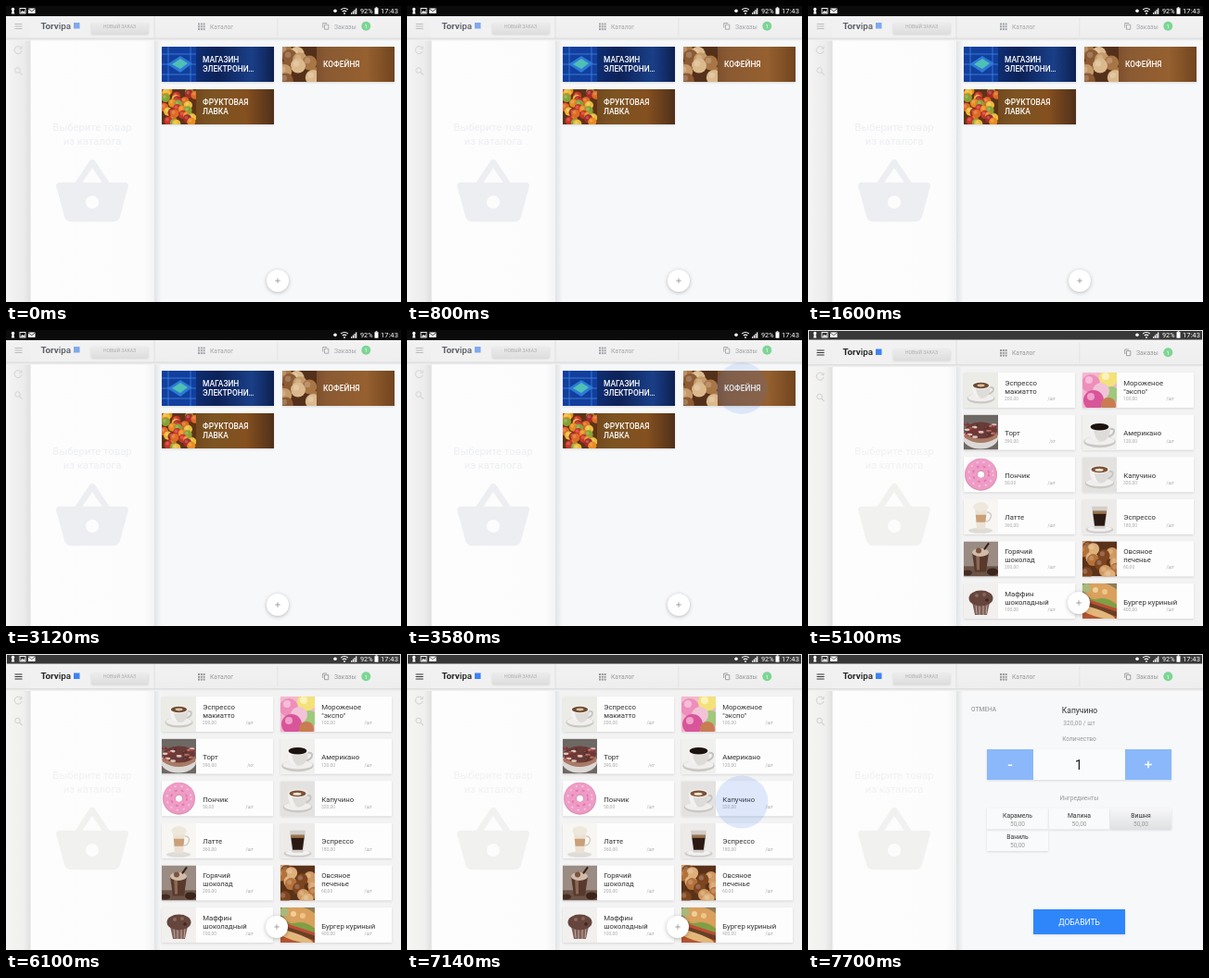
An HTML page that plays this animation: 426 px wide and 320 px high, repeating every 8 s.

```html
<!DOCTYPE html>
<html lang="ru">
<head>
<meta charset="utf-8">
<title>Касса</title>
<style>
  html, body { margin: 0; width: 100%; height: 100%; overflow: hidden; background: #f6f7f9; }
  svg { display: block; width: 100%; height: 100%; font-family: Roboto, sans-serif; }
  .lift { filter: drop-shadow(0 1px 1.3px rgba(0, 0, 0, .12)); }
  .fab { filter: drop-shadow(0 1px 2px rgba(0, 0, 0, .25)); }
  .screen, .tap { animation: 8s linear infinite both; }
  #list { animation-name: openList; }
  #detail { animation-name: openDetail; }
  .tap { transform-box: fill-box; transform-origin: center; }
  #tapShop { animation-name: tapShop; }
  #tapItem { animation-name: tapItem; }
  @keyframes openList { 0%, 45.5% { opacity: 0 } 47.5%, 100% { opacity: 1 } }
  @keyframes openDetail { 0%, 92.5% { opacity: 0 } 94.5%, 100% { opacity: 1 } }
  @keyframes tapShop {
    0%, 40.5% { opacity: 0; transform: scale(.5) }
    42%, 44.5% { opacity: .16; transform: scale(1) }
    46%, 100% { opacity: 0; transform: scale(1) }
  }
  @keyframes tapItem {
    0%, 87% { opacity: 0; transform: scale(.5) }
    88.5%, 91.5% { opacity: .16; transform: scale(1) }
    93%, 100% { opacity: 0; transform: scale(1) }
  }
</style>
</head>
<body>
<script>
const rect = (x, y, w, h, fill, more = '') =>
  `<rect x="${x}" y="${y}" width="${w}" height="${h}" fill="${fill}" ${more}/>`;
const disc = (x, y, r, fill, more = '') => `<circle cx="${x}" cy="${y}" r="${r}" fill="${fill}" ${more}/>`;
const oval = (x, y, rx, ry, fill) => `<ellipse cx="${x}" cy="${y}" rx="${rx}" ry="${ry}" fill="${fill}"/>`;
const path = (d, fill) => `<path d="${d}" fill="${fill}"/>`;
const line = (d, stroke, width = 1) => `<path d="${d}" fill="none" stroke="${stroke}" stroke-width="${width}"/>`;
const text = (x, y, size, fill, str, anchor = 'start', weight = 400) =>
  `<text x="${x}" y="${y}" font-size="${size}" fill="${fill}" text-anchor="${anchor}" font-weight="${weight}">${str}</text>`;
const at = (x, y, body) => `<g transform="translate(${x} ${y})">${body}</g>`;
const turn = (angle, body) => `<g transform="rotate(${angle} 18 19)">${body}</g>`;
const gradient = (id, dir, ...stops) =>
  `<linearGradient id="${id}" x2="${dir === 'h' ? 1 : 0}" y2="${dir === 'h' ? 0 : 1}">` +
  stops.map(([offset, color]) => `<stop offset="${offset}" stop-color="${color}"/>`).join('') + '</linearGradient>';

function random(seed) {
  return () => (seed = seed * 16807 % 2147483647) / 2147483647;
}

// Overlapping balls, used for piles of food
function pile(seed, count, radius, colors) {
  const rnd = random(seed);
  return Array.from({ length: count }, (_, i) => {
    const x = rnd() * 37, y = (i + .5) / count * 38, color = colors[i % colors.length];
    return disc(x, y, radius, color) + disc(x - radius * .25, y - radius * .3, radius * .4, '#fff', 'opacity=".2"');
  }).join('');
}

const backdrop = color => rect(0, 0, 37, 38, color);

const cup = (drink, back, scale = 1) => backdrop(back) +
  `<g transform="translate(18.5 20) scale(${scale}) translate(-19 -20)">` +
  oval(19, 28, 15, 5.5, '#c9c8c5') + oval(19, 27, 14, 4.2, '#f0efed') +
  line('M28 16q6-1 4 4q-2 3-6 3', '#c4c3c0', 1.8) +
  path('M9 14q0 14 10 14t10-14z', '#dddcd9') + path('M9 14q0 14 10 14q-5-3-6-14z', '#f3f2f0') +
  oval(19, 14, 10, 4.2, '#f4f3f1') + oval(19, 14, 8.6, 3.3, drink) + '</g>';

const pictures = {
  macchiato: cup('#6d4a30', '#ecece7') + oval(18.5, 14, 4, 1.4, '#d8bea0'),
  cake: backdrop('#6e6865') + oval(18, 25, 19, 12, '#dcd8d6') + path('M1 17v8q17 11 35 0v-8z', '#a87b66') +
    oval(18.5, 17, 17.5, 9, '#6a3a36') +
    `<g transform="translate(3 10) scale(.82 .38)">${pile(15, 22, 3.6, ['#8c2f33', '#d9c5bb', '#56302c', '#b4605a'])}</g>`,
  donut: disc(18.5, 19, 10.5, 'none', 'stroke="#d88fae" stroke-width="14"') +
    disc(18.5, 18.5, 10.5, 'none', 'stroke="#ee9cc6" stroke-width="12.5"') +
    disc(18.5, 18.5, 13, 'none', 'stroke="#f6c9de" stroke-width="1.6" stroke-dasharray="2 5"') +
    disc(18.5, 18.5, 8.5, 'none', 'stroke="#e377af" stroke-width="1.8" stroke-dasharray="3 4"'),
  latte: backdrop('#f7f6f3') + oval(18, 34, 13, 3, '#dedcd8') + path('M12 9h13l-2 24h-9z', '#ebe1d4') +
    path('M12.8 17h11.4l-.8 8h-9.8z', '#c9a077') + oval(18.5, 8.5, 8, 5, '#eee7dc') +
    line('M25 14q6 1 4 6t-5 4', '#d3cbc4', 1.4),
  chocolate: backdrop('#9a8b83') + rect(0, 27, 37, 11, '#6b5347') + path('M9 12h18l-3 21h-12z', '#59392c') +
    path('M13 13h4v18h-3z', '#8a6856') + oval(18, 12, 9, 4.5, '#d1bba9') + disc(16, 10, 3, '#7b5440') +
    line('M22 9l5-7', '#3a2018', 2) + oval(31, 33, 6, 4, '#3b241b') + oval(4, 34, 5, 3, '#452c22'),
  muffin: backdrop('#f1f0ee') + path('M9 20h19l-3 14h-13z', '#7e5f57') +
    line('M13 22l1 11M17 22v12M21 22v12M25 22l-1 11', '#c2aaa1', 1) +
    oval(18.5, 16, 13, 8.5, '#66453d') + disc(14, 13, 2, '#8d6b60') + disc(22, 12, 2, '#87655a') + disc(25, 18, 1.8, '#3c2721'),
  iceCream: backdrop('#f3b9cd') + disc(28, 6, 10, '#f3e27a') + disc(9, 12, 10, '#ee8ebb') + disc(31, 24, 9, '#9fc97c') +
    disc(20, 20, 9, '#f2c3d8') + disc(12, 30, 11, '#d9559a') + disc(28, 35, 8, '#c97c52') +
    disc(9, 26, 4, '#f0a0c8') + disc(25, 4, 4, '#faf2b8') + disc(7, 8, 4, '#f7bdd8'),
  americano: cup('#1c120e', '#f0f0ee', 1.15),
  cappuccino: cup('#7d5136', '#e3e2e0', 1.05) + oval(18, 14, 4.5, 1.5, '#efe4d4'),
  espresso: backdrop('#ecebe9') + oval(18.5, 33, 15, 4, '#cfcdca') + oval(18.5, 32, 13, 3, '#f2f1ef') +
    path('M10 8h17l-2.6 24h-11.8z', '#d2cfcb') + path('M11 13h15l-2.2 16h-10.6z', '#2b1a13') + rect(11, 13, 15, 3, '#a1744a'),
  cookies: backdrop('#5a3219') + pile(77, 16, 6.5, ['#b4713a', '#d09a62', '#7d451f', '#deb07a']),
  burger: backdrop('#8d7c56') + turn(18, rect(-6, 24, 50, 20, '#b5542f') + oval(20, 10, 21, 11, '#d9a05e') +
    path('M-4 16q10 7 20 1t24 1v6h-44z', '#7f9f45') + rect(-4, 21, 46, 3, '#c24a35') +
    rect(-4, 24, 46, 5, '#6b3f25') + oval(18, 32, 22, 4, '#e3b77c')) +
    disc(4, 5, 5, '#a9b87a') + disc(14, 7, 3, '#f0cf98') + disc(24, 9, 3, '#efc588'),
  chip: rect(0, 0, 37, 38, '#123f9e') + line('M0 8h37M0 30h37M7 0v38M31 0v38M0 19h37', '#3f86e0', .8) +
    path('M6 19l14-9l13 8l-13 10z', '#2d7ad6') + path('M11 19l9-6l8 5l-8 6z', '#4fc0b4'),
  nuts: rect(0, 0, 37, 38, '#54301b') + pile(31, 12, 8, ['#c59a6a', '#a87645', '#dbb98c', '#8c5b33']),
  fruit: rect(0, 0, 37, 38, '#5d3317') + pile(9, 34, 4.6, ['#c9342a', '#e98b22', '#86a236', '#e9bd3d', '#a52a2a', '#dd6b24'])
};

function header(dy, dim, ink) {
  const gray = dim ? '#a2a5aa' : '#999';
  const icon = dim ? '#d3d3d3' : '#cfcfcf';
  const grid = [0, 1, 2].flatMap(r => [0, 1, 2].map(c => rect(207 + c * 2.8, 18.5 + r * 2.8, 2, 2, gray))).join('');
  return rect(0, 10, 426, 25 + dy, 'url(#bar)') + rect(26, 10, 134, 25 + dy, '#f1f1f1') +
    rect(159.6, 10, .8, 25 + dy, '#dcdcdc') + rect(292.6, 13, .6, 20 + dy, '#dcdcdc') +
    rect(0, 34.5 + dy, 426, 3, 'url(#shade)') +
    at(0, dy, line('M9.5 19.5h8M9.5 22h8M9.5 24.5h8', ink, 1.2) +
      text(37.5, 24.6, 9.8, dim ? '#5c5f66' : '#222', 'Torv<tspan font-weight="500">ipa</tspan>', 'start', 700) +
      rect(73, 18, 6.5, 6.5, dim ? '#7fa9ee' : '#3f82f5') +
      rect(92, 18, 61.5, 12, 'url(#button)', 'class="lift"') +
      text(122.5, 23.8, 5, '#aaa', 'НОВЫЙ ЗАКАЗ', 'middle') +
      grid + text(220, 24.6, 6.7, gray, 'Каталог') +
      line('M341.7 23.5v-5h4.5M343.5 20.2h4.3v5h-4.3z', gray, .9) + text(354, 24.6, 6.8, gray, 'Заказы') +
      disc(388.3, 21.8, 5, '#7cd695') + text(388.3, 24, 6, '#fff', '1', 'middle') +
      line('M16.5 45.5a4 4 0 1 0 .5 3M17 43.5v2.6h-2.6', icon, 1) +
      disc(12.5, 69.5, 2.8, 'none', `stroke="${icon}"`) + line('M14.6 71.6l3 3', icon, 1.2));
}

const basket = 'M17.21 9l-4.38-6.56c-.19-.28-.51-.42-.83-.42s-.64.14-.83.43L6.79 9H2c-.55 0-1 .45-1 1l.04.27 2.54 9.27' +
  'c.23.84 1 1.46 1.92 1.46h13c.92 0 1.69-.62 1.93-1.46L23 10c0-.55-.45-1-1-1zM9 9l3-4.4L15 9zm3 8a2 2 0 1 1 0-4 2 2 0 0 1 0 4z';

function sidebar(side, color) {
  return rect(0, 34, 27, 286, `url(#${side})`) + rect(26.5, 34, 133.5, 286, 'url(#panel)') +
    text(93, 135, 11.3, color, 'Выберите товар', 'middle') + text(93, 149.5, 11.3, color, 'из каталога', 'middle') +
    `<g transform="translate(50.5 158.8) scale(3.545)">${path(basket, color)}</g>` +
    rect(160, 34, 7, 286, 'url(#edge)');
}

const fab = (x, y) => disc(x, y, 12, '#fff', 'class="fab"') +
  line(`M${x - 2.7} ${y}h5.4M${x} ${y - 2.7}v5.4`, '#999', .9);

function shop(x, y, fill, picture, ...names) {
  const first = names.length > 1 ? 17 : 22.2;
  return at(x, y, rect(0, 0, 121, 38, `url(#${fill})`, 'class="lift"') +
    `<g clip-path="url(#thumb)">${pictures[picture]}</g>` +
    names.map((name, i) => text(44, first + i * 10, 8.4, '#fff', name, 'start', 500)).join(''));
}

function product(x, row, picture, name, price, unit = '/шт') {
  const lines = name.split('|');
  return at(x, 46 + row * 45.6, rect(0, 0, 120, 38, '#fdfdfd', 'class="lift"') +
    `<g clip-path="url(#thumb)">${pictures[picture]}</g>` +
    lines.map((str, i) => text(44.2, 22.6 - (lines.length - 1 - i) * 8.8, 7.75, '#333', str)).join('') +
    text(44, 30, 5, '#aaa', price + ',00') + text(99, 30, 5, '#aaa', unit, 'end'));
}

const products = [
  ['macchiato', 'Эспрессо|макиатто', 200], ['iceCream', 'Мороженое|"экспо"', 100],
  ['cake', 'Торт', 390, '/кг'], ['americano', 'Американо', 120],
  ['donut', 'Пончик', 50], ['cappuccino', 'Капучино', 320],
  ['latte', 'Латте', 360], ['espresso', 'Эспрессо', 180],
  ['chocolate', 'Горячий|шоколад', 200], ['cookies', 'Овсяное|печенье', 60],
  ['muffin', 'Маффин|шоколадный', 100], ['burger', 'Бургер куриный', 400]
];

const statusBar = (back, rim) => rect(0, 0, 426, 11, rim) + rect(1, 1, 424, 9.5, back) +
  disc(7.5, 3.4, 1.7, '#fff') + path('M6.8 4h1.4l1 4.5h-3.4z', '#fff') +
  rect(15, 2.5, 6, 5.5, 'none', 'stroke="#fff" stroke-width=".9"') + path('M15.5 7.5l2-2.5 1.2 1.3 1-1 1 2.2z', '#fff') +
  rect(24, 2.5, 7.5, 5.5, '#fff') + line('M24 3l3.7 2.7L31.5 3', back, .8) +
  disc(355, 5.2, 1.8, '#fff') +
  line('M361.2 4q3.8-3 7.6 0M362.8 6q2.2-1.7 4.4 0', '#fff', 1.1) + disc(365, 8, .9, '#fff') +
  [0, 1, 2, 3].map(i => rect(372 + i * 1.7, 7.2 - i * 1.6, 1.2, 1.6 + i * 1.6, '#fff')).join('') +
  text(382, 8.1, 7.3, '#fff', '92%') + rect(397.5, 2.2, 4, 6.5, '#fff') + rect(398.6, 1.2, 1.8, 1, '#fff') +
  text(404, 8.2, 7.6, '#fff', '17:43');

const home = rect(160, 34, 266, 286, '#f6f8fa') + sidebar('sideDim', '#eceef2') + header(0, true, '#bbb') +
  shop(168, 44, 'blue', 'chip', 'МАГАЗИН', 'ЭЛЕКТРОНИ…') + shop(298, 44, 'coffee', 'nuts', 'КОФЕЙНЯ') +
  shop(168, 90, 'fruits', 'fruit', 'ФРУКТОВАЯ', 'ЛАВКА') + fab(293, 297) + statusBar('#0b0b0b', '#0b0b0b');

const list = rect(160, 34, 266, 286, '#f3f3f4') + sidebar('side', '#f1f1f0') +
  products.map((p, i) => product(i % 2 ? 296 : 168, i >> 1, ...p)).join('') + header(2.5, false, '#333') + fab(292, 295) +
  statusBar('#383838', '#e8e8e8');

function ingredient(x, y, name, fill = '#f9fafb') {
  return rect(x, y, 66, 23, fill, 'class="lift"') + text(x + 33, y + 10, 6.8, '#333', name, 'middle') +
    text(x + 33, y + 19, 6.5, '#999', '50,00', 'middle');
}

const detail = rect(160, 37.5, 266, 283, '#f7f8fa') + rect(160, 37, 7, 283, 'url(#edge)') +
  rect(160, 37, 266, 3, 'url(#shade)') +
  text(176, 61.5, 6.6, '#888', 'ОТМЕНА') + text(293, 64, 8.5, '#333', 'Капучино', 'middle') +
  text(292.5, 76.5, 6.6, '#999', '320,00 / шт', 'middle') + text(292.5, 93.5, 6.6, '#999', 'Количество', 'middle') +
  `<g class="lift">${rect(193, 103, 199, 33, '#fafbfc')}${rect(193, 103, 50, 33, '#8ab8fb')}${rect(342, 103, 50, 33, '#8ab8fb')}</g>` +
  line('M215.8 120.3h4.4M363.2 119.5h7.6M367 115.7v7.6', '#fff', 1.5) +
  text(292, 125, 15, '#222', '1', 'middle') + text(292.5, 157.5, 6.6, '#999', 'Ингредиенты', 'middle') +
  ingredient(193, 190, 'Ваниль') + ingredient(193, 166.5, 'Карамель') + ingredient(259.5, 166.5, 'Малина') +
  ingredient(326, 166.5, 'Вишня', 'url(#chosen)') +
  rect(243, 276, 99, 27, '#2f86fb', 'class="lift"') + text(292.5, 292.8, 8.5, '#fff', 'ДОБАВИТЬ', 'middle');

const defs = '<clipPath id="thumb"><rect width="37" height="38"/></clipPath>' +
  gradient('bar', 'v', [0, '#f2f2f2'], [1, '#eee']) +
  gradient('shade', 'v', [0, '#dadada'], [1, '#f3f3f3']) +
  gradient('button', 'v', [0, '#ececec'], [1, '#dedede']) +
  gradient('sideDim', 'h', [0, '#f4f4f4'], [.7, '#ececec'], [1, '#dedede']) +
  gradient('side', 'h', [0, '#f5f5f4'], [.7, '#f0f0ef'], [1, '#dedede']) +
  gradient('panel', 'h', [0, '#fdfdfd'], [.92, '#fcfcfc'], [1, '#f3f3f3']) +
  gradient('edge', 'h', [0, '#e2e3e4'], [1, '#f5f6f8']) +
  gradient('blue', 'h', [0, '#123f9e'], [.5, '#0c2258'], [.8, '#1a3f88'], [1, '#0d2050']) +
  gradient('coffee', 'h', [0, '#54301b'], [.4, '#8a5a33'], [.75, '#96602f'], [1, '#71451f']) +
  gradient('fruits', 'h', [0, '#5d3317'], [.45, '#7c5422'], [.75, '#85501f'], [1, '#50301a']) +
  gradient('chosen', 'v', [0, '#f7f7f8'], [1, '#dfe1e4']);

document.body.innerHTML = `<svg viewBox="0 0 426 320" preserveAspectRatio="none"><defs>${defs}</defs>
  <g>${home}</g>${disc(361, 63, 28, '#3f7fee', 'id="tapShop" class="tap"')}
  <g id="list" class="screen">${list}</g>${disc(361, 160, 28.5, '#3f7fee', 'id="tapItem" class="tap"')}
  <g id="detail" class="screen">${detail}</g></svg>`;
</script>
</body>
</html>
```
